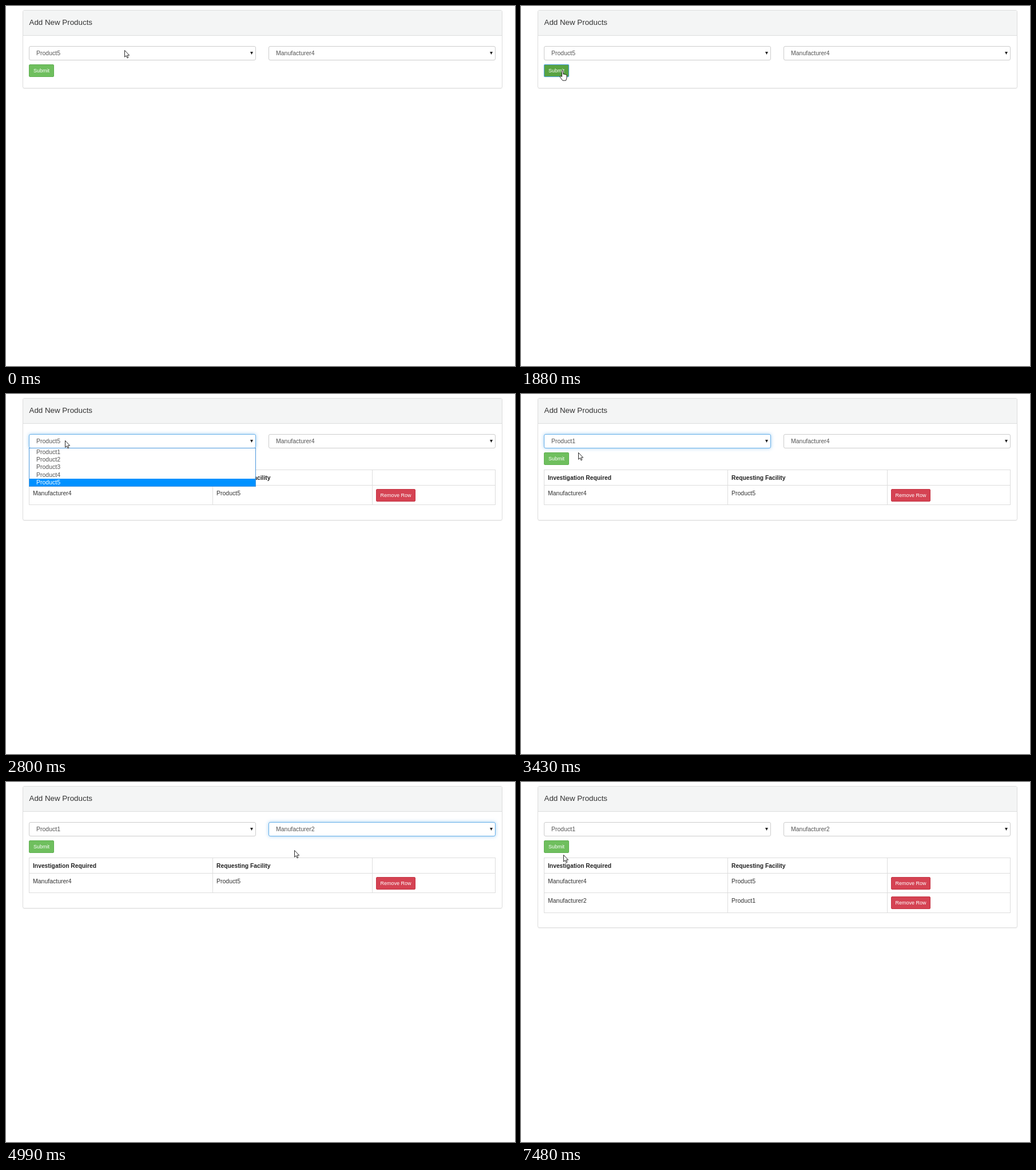
These frames come from a looping animation (890x629 px, 7550 ms). An HTML page:

```html
<!DOCTYPE html>
<html lang="en">
<head>
<meta charset="utf-8">
<title>Add New Products</title>
<style>
  html, body { margin: 0; width: 100%; height: 100%; overflow: hidden; background: #fff; }
  body { font: 10.5px "Liberation Sans", Arial, sans-serif; color: #333; }
  * { box-sizing: border-box; }
  #stage { position: relative; width: 890px; height: 629px; overflow: hidden; }
  #stage div, #stage svg { position: absolute; white-space: nowrap; }

  /* Every timed part shares one clock and changes in hard steps. */
  .timed { animation: 7550ms step-end infinite; }

  .panel { left: 29px; top: 7px; width: 839px; height: 137px; border: 1px solid #ddd; border-radius: 3px;
    box-shadow: 0 1px 1px rgba(0,0,0,.05); animation-name: grow; }
  .title { left: 0; top: 0; width: 100%; height: 44px; padding-left: 10.5px; background: #f4f5f5;
    border-bottom: 1px solid #ddd; font-size: 13.35px; line-height: 42px; }

  .select { top: 70px; width: 397px; height: 25px; border: 1px solid #ccc; border-radius: 3px;
    background: #fff; color: #555; line-height: 23px; }
  .select::after { content: ""; position: absolute; right: 4px; top: 9px; width: 5px; height: 5px;
    background: #222; clip-path: polygon(0 0, 100% 0, 50% 100%); }
  .select div { left: 12px; top: 0; }
  .product { left: 40px; }
  .maker { left: 459px; }
  .select.product { animation-name: focus-product; }
  .select.maker { animation-name: focus-maker; }

  .list { top: 94px; width: 397px; height: 68px; border: 1px solid #4a97dc; background: #fff;
    color: #555; visibility: hidden; z-index: 2; }
  .list p { margin: 0; padding-left: 12px; height: 13.2px; line-height: 13.2px; }
  .list.product { animation-name: open-product; }
  .list.maker { animation-name: open-maker; }

  .button { height: 22px; border: 1px solid; border-radius: 2px; color: #fff; font-size: 9px;
    line-height: 20px; text-align: center; }
  .submit { left: 40px; top: 102px; width: 44px; background: #6fbf5e; border-color: #60b052;
    animation-name: press; }
  .remove { left: 606px; top: 6px; width: 69px; background: #d54353; border-color: #c53444; }

  .row { left: 40px; width: 816px; border: 1px solid #ddd; visibility: hidden; line-height: 27px; }
  .row .cell { top: 0; height: 100%; padding-left: 6px; }
  .cell + .cell { left: 320px; width: 280px; border: solid #ddd; border-width: 0 1px; }
  .head { top: 132px; height: 28px; font-weight: bold; font-size: 10.3px; color: #222; animation-name: first-row; }
  .one { top: 159px; height: 35px; animation-name: first-row; }
  .two { top: 193px; height: 36px; animation-name: second-row; }

  .cursor { left: 0; top: 0; z-index: 3; animation-name: travel; }
  .cursor svg { overflow: visible; fill: #fff; stroke: #111; stroke-width: .9; stroke-linejoin: round; }
  .arrow { left: 0; top: 0; animation-name: arrow; }
  .hand { left: -6px; top: 0; animation-name: hand; }

  @keyframes grow { 0% { height: 137px } 26.09% { height: 214px } 90.99% { height: 248px } }
  @keyframes first-row { 0% { visibility: hidden } 26.09%, 100% { visibility: visible } }
  @keyframes second-row { 0% { visibility: hidden } 90.99%, 100% { visibility: visible } }

  @keyframes press {
    0%, 26.09%, 90.99% { background: #6fbf5e; border-color: #60b052; box-shadow: none }
    21.72%, 74.43% { background: #58a342; border-color: #4c9539; box-shadow: none }
    23.97%, 86.75% { background: #58a342; border-color: #4a9fdc; box-shadow: 0 0 1px #4a9fdc }
  }
  @keyframes focus-product {
    0%, 50.59% { border-color: #ccc; box-shadow: none }
    34.03% { border-color: #66afe9; box-shadow: 0 0 6px rgba(102,175,233,.6) }
  }
  @keyframes focus-maker {
    0%, 86.75% { border-color: #ccc; box-shadow: none }
    50.59% { border-color: #66afe9; box-shadow: 0 0 6px rgba(102,175,233,.6) }
  }
  @keyframes open-product { 0%, 45.42% { visibility: hidden } 35.03% { visibility: visible } }
  @keyframes open-maker { 0%, 64.1% { visibility: hidden } 51.61% { visibility: visible } }

  /* Chosen values */
  .product-old { animation-name: product-old; }
  .product-new { animation-name: product-new; }
  .maker-old { animation-name: maker-old; }
  .maker-new { animation-name: maker-new; }
  @keyframes product-old { 0% { visibility: visible } 45.42%, 100% { visibility: hidden } }
  @keyframes product-new { 0% { visibility: hidden } 45.42%, 100% { visibility: visible } }
  @keyframes maker-old { 0% { visibility: visible } 64.1%, 100% { visibility: hidden } }
  @keyframes maker-new { 0% { visibility: hidden } 64.1%, 100% { visibility: visible } }

  /* Highlighted options */
  .p1 { animation-name: p1; }
  .p5 { animation-name: p5; }
  .m1 { animation-name: m1; }
  .m2 { animation-name: m2; }
  .m4 { animation-name: m4; }
  @keyframes p1 { 43.41%, 100% { background: #0091ff; color: #fff } }
  @keyframes p5 { 0% { background: #0091ff; color: #fff } 43.41% { background: none; color: #555 } }
  @keyframes m1 { 56.95% { background: #0091ff; color: #fff } 58.99% { background: none; color: #555 } }
  @keyframes m2 { 58.99%, 100% { background: #0091ff; color: #fff } }
  @keyframes m4 { 0% { background: #0091ff; color: #fff } 56.95% { background: none; color: #555 } }

  @keyframes arrow {
    0%, 28.98%, 99.07%, 100% { visibility: visible }
    21.72%, 74.43% { visibility: hidden }
  }
  @keyframes hand {
    0%, 28.98%, 99.07%, 100% { visibility: hidden }
    21.72%, 74.43% { visibility: visible }
  }
  @keyframes travel {
    0% { transform: translate(207px, 77px) }
    15.76% { transform: translate(207px, 77px); animation-timing-function: steps(7, start) }
    22.71% { transform: translate(73px, 112px) }
    26.95% { transform: translate(73px, 112px); animation-timing-function: steps(7, start) }
    34.06% { transform: translate(103px, 81px) }
    40.39% { transform: translate(103px, 81px); animation-timing-function: steps(6, start) }
    46.43% { transform: translate(100px, 102px); animation-timing-function: steps(4, start) }
    50.52% { transform: translate(478px, 79px) }
    50.59% { transform: translate(478px, 79px); animation-timing-function: steps(4, start) }
    54.67% { transform: translate(500px, 92px) }
    56.95% { transform: translate(504px, 104px) }
    57.94% { transform: translate(504px, 104px); animation-timing-function: steps(5, start) }
    63.15% { transform: translate(504px, 116px) }
    65.03% { transform: translate(504px, 118px) }
    66.09% { transform: translate(504px, 119px) }
    67.01% { transform: translate(458px, 121px) }
    70.33% { transform: translate(72px, 101px) }
    74.43% { transform: translate(68px, 107px) }
    75.43% { transform: translate(65px, 113px) }
    76.42% { transform: translate(62px, 118px) }
    78.41% { transform: translate(66px, 118px) }
    82.64% { transform: translate(68px, 118px) }
    99.07%, 100% { transform: translate(74px, 127px) }
  }
</style>
</head>
<body>
<div id="stage">
  <div class="panel timed"><div class="title">Add New Products</div></div>

  <div class="select product timed">
    <div class="product-old timed">Product5</div>
    <div class="product-new timed">Product1</div>
  </div>
  <div class="select maker timed">
    <div class="maker-old timed">Manufacturer4</div>
    <div class="maker-new timed">Manufacturer2</div>
  </div>
  <div class="button submit timed">Submit</div>

  <div class="row head timed">
    <div class="cell">Investigation Required</div><div class="cell">Requesting Facility</div>
  </div>
  <div class="row one timed">
    <div class="cell">Manufacturer4</div><div class="cell">Product5</div>
    <div class="button remove">Remove Row</div>
  </div>
  <div class="row two timed">
    <div class="cell">Manufacturer2</div><div class="cell">Product1</div>
    <div class="button remove">Remove Row</div>
  </div>

  <div class="list product timed">
    <p class="p1 timed">Product1</p>
    <p>Product2</p>
    <p>Product3</p>
    <p>Product4</p>
    <p class="p5 timed">Product5</p>
  </div>
  <div class="list maker timed">
    <p class="m1 timed">Manufacturer1</p>
    <p class="m2 timed">Manufacturer2</p>
    <p>Manufacturer3</p>
    <p class="m4 timed">Manufacturer4</p>
    <p>Manufacturer5</p>
  </div>

  <div class="cursor timed">
    <svg class="arrow timed" width="10" height="15"><path d="M.5.5V12.2L3.2 9.7 5 13.9 6.8 13.1 5.1 9.1H8.6Z"/></svg>
    <svg class="hand timed" width="14" height="20"><path d="M4.5 11.5V1.8a1.2 1.2 0 0 1 2.4 0V7.2q1.1-1 2.2.4 1.2-.7 2.1.5 1.6-.5 1.8 1.1v4.6l-1.5 4.4H5.8L1.2 12q-.3-1.8 1.5-1.5z"/></svg>
  </div>
</div>
</body>
</html>
```
